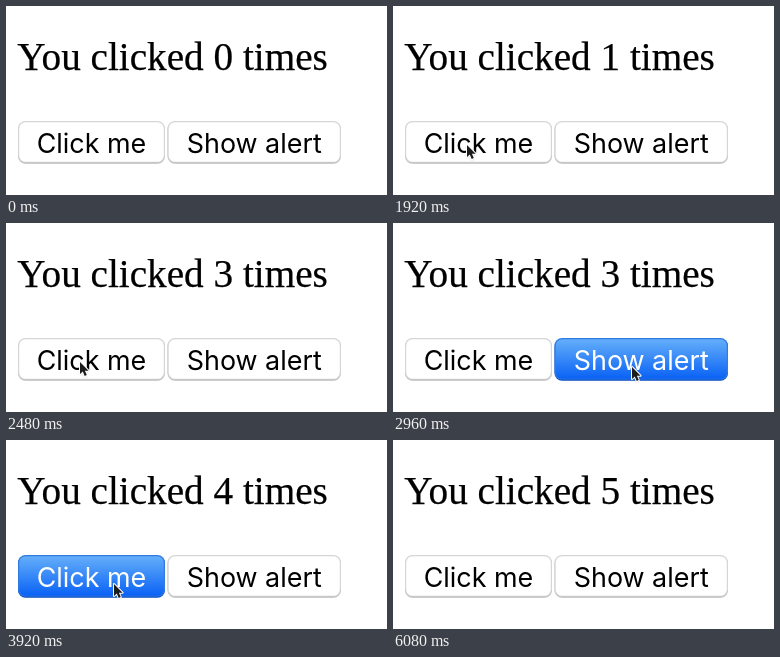
Write an HTML page that moves like this. It is 381 px wide and 189 px high and loops after 6960 ms.

```html
<!DOCTYPE html>
<html lang="en">
<head>
<meta charset="utf-8">
<title>Click counter</title>
<style>
  html, body { margin: 0; width: 100%; height: 100%; overflow: hidden; background: #fff; }
  svg { display: block; width: 100vw; height: 100vh; }
  .count { font: 39.2px "Liberation Serif", "Times New Roman", serif; stroke: #000; stroke-width: .25; }
  .btn text { font: 26.9px Inter, sans-serif; text-anchor: middle; }
  .edge { fill: #bcbcbc; }
  .rim { fill: #d6d6d6; }
  .face { fill: #fff; }
  .down .edge { fill: #0a4fc4; }
  .down .rim { fill: #2f7be0; }
  .down .face { fill: url(#blue); }
  .down text { fill: #fff; }
</style>
</head>
<body>
<svg viewBox="0 0 381 189">
  <defs>
    <linearGradient id="blue" x2="0" y2="1">
      <stop stop-color="#64aefa"/>
      <stop offset="1" stop-color="#0a62f5"/>
    </linearGradient>
    <filter id="soft" x="-50%" y="-50%" width="200%" height="200%">
      <feGaussianBlur stdDeviation="1"/>
    </filter>
    <path id="arrow" d="M0 0V12L2.8 9.5L4.7 14L6.8 13.1L4.9 8.8H8.6Z"/>
  </defs>
  <rect width="381" height="189" fill="#fff"/>
  <text class="count" x="11.2" y="63.7">You clicked <tspan id="num">0</tspan> times</text>
  <g id="buttons"></g>
  <g id="cursor" fill="#1c1c1c">
    <use href="#arrow" y="1" opacity=".35" filter="url(#soft)"/>
    <use href="#arrow" stroke="#fff" stroke-width="2" stroke-linejoin="round"/>
    <use href="#arrow"/>
  </g>
</svg>
<script>
const LOOP = 6960, TICK = 80, SHOW = 240, HIDE = 6080;
const byId = id => document.getElementById(id);

// Each move curves from the last stop past a bend to its own stop
const entry = [289, 66];
const moves = [
  { from: 240, to: 800, bend: [9, 120], stop: [70, 88] },
  { from: 1120, to: 1440, bend: [70, 112], stop: [74, 139] },
  { from: 2480, to: 2880, bend: [156, 148], stop: [239, 144] },
  { from: 3120, to: 3520, bend: [173, 156], stop: [108, 144] },
  { from: 4080, to: 4720, bend: [67, 58], stop: [97, 89] },
  { from: 5680, to: 6000, bend: [160, 86], stop: [350, 52] }
];

const presses = [
  { btn: 0, down: 1760, up: 1920 },
  { btn: 0, down: 2080, up: 2240 },
  { btn: 0, down: 2320, up: 2480 },
  { btn: 1, down: 2960, up: 3120 },
  { btn: 0, down: 3600, up: 3680 },
  { btn: 0, down: 3920, up: 4000 }
];

const button = (x, w, label) => `<g class="btn">
  <rect class="edge" x="${x}" y="116" width="${w}" height="41.8" rx="7.5"/>
  <rect class="rim" x="${x}" y="115" width="${w}" height="41.6" rx="7.5"/>
  <rect class="face" x="${x + 1.2}" y="116.2" width="${w - 2.4}" height="39.6" rx="6.5"/>
  <text x="${x + w / 2}" y="147">${label}</text></g>`;
byId("buttons").innerHTML = button(12, 147, "Click me") + button(161.5, 173.5, "Show alert");
const buttons = [...document.querySelectorAll(".btn")];

const ease = k => (k + k * k * (3 - 2 * k)) / 2;
const curve = (a, b, c, k) => (1 - k) ** 2 * a + 2 * k * (1 - k) * b + k * k * c;

function place(t) {
  let at = entry;
  for (const { from, to, bend, stop } of moves) {
    if (t < from) break;
    const k = ease(Math.min(1, (t - from) / (to - from)));
    at = at.map((v, i) => curve(v, bend[i], stop[i], k));
  }
  return at;
}

function draw(ms) {
  const t = Math.floor((ms % LOOP) / TICK) * TICK;
  byId("num").textContent = presses.filter(p => p.btn === 0 && t >= p.up).length;
  buttons.forEach((el, i) => el.classList.toggle("down",
    presses.some(p => p.btn === i && t >= p.down && t < p.up)));
  const cursor = byId("cursor");
  cursor.style.display = t >= SHOW && t < HIDE ? "" : "none";
  cursor.setAttribute("transform", `translate(${place(t)})`);
}

const start = performance.now();
function frame() {
  draw(performance.now() - start);
  requestAnimationFrame(frame);
}
draw(0);
requestAnimationFrame(frame);
</script>
</body>
</html>
```
